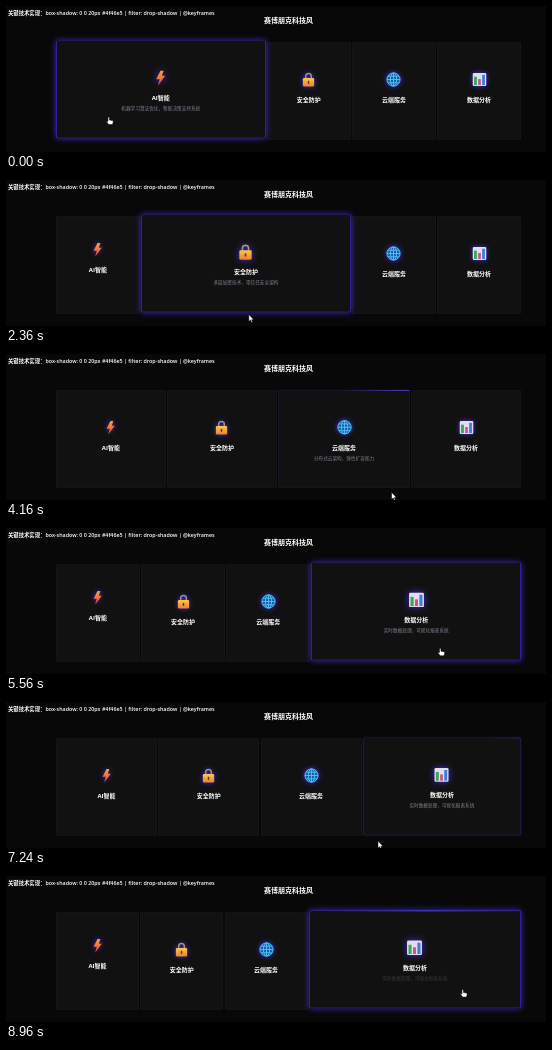
An HTML page for the animation above (9000 ms loop, 540 px wide and 146 px high).

```html
<!DOCTYPE html>
<html lang="zh">
<head>
<meta charset="utf-8">
<style>
  html, body { margin: 0; width: 100%; height: 100%; overflow: hidden; background: #080808; }
  body { position: relative; color: #fff; font-family: "Open Sans", "Noto Sans CJK SC", "Noto Sans CJK", sans-serif; }
  .note, h1 { position: absolute; margin: 0; white-space: nowrap; }
  .note { left: 2px; top: 2.7px; font-size: 5.35px; line-height: 8px; font-weight: 600; }
  h1 { left: 50px; width: 465px; top: 9.5px; text-align: center; font-size: 7px; line-height: 10px; font-weight: 700; }
  .row { position: absolute; left: 50px; top: 36px; width: 465px; height: 97.5px; display: flex; gap: 1.3px; }
  .card { position: relative; flex: 1 1 0; min-width: 0; overflow: hidden; border-radius: 2px; background: #111;
    display: flex; flex-direction: column; align-items: center; justify-content: center; }
  .line { position: absolute; top: 0; width: 100%; height: 1px; background: linear-gradient(90deg, transparent, #4f46e5, transparent); }
  .icon { width: 15px; height: 15px; margin: 4px 0 3px; overflow: visible; flex: none; }
  b { margin-top: 6px; font-size: 6px; line-height: 8px; white-space: nowrap; }
  p { margin: 3.2px 0 0; padding: 0 7.5px; font-size: 4.65px; line-height: 7px; color: #7a808c; text-align: center; }
  #cursor { position: absolute; z-index: 5; left: 0; top: 0; width: 8px; height: 10px; overflow: visible; }
  #cursor path { fill: #fff; stroke: #000; stroke-width: .5; }
</style>
</head>
<body>
<div class="note">关键技术实现：box-shadow: 0 0 20px #4f46e5 | filter: drop-shadow | @keyframes</div>
<h1>赛博朋克科技风</h1>
<div class="row"></div>
<svg id="cursor">
  <path id="arrow" d="M0 0V7L1.6 5.6 2.7 8 3.8 7.5 2.8 5.2H5Z"/>
  <path id="hand" d="M0 .6Q.8-.4 1.5.6V3L4.6 3.6Q5.5 3.9 5.2 5L4.6 7.6H.8L-1.6 4.6Q-1.4 3.6 0 4.6Z"/>
</svg>
<svg width="0" height="0" style="position:absolute">
  <linearGradient id="fire" x2="0" y2="1"><stop stop-color="#ffa03a"/><stop offset="1" stop-color="#e8483f"/></linearGradient>
  <linearGradient id="gold" x2="0" y2="1"><stop stop-color="#ffc648"/><stop offset="1" stop-color="#ec8030"/></linearGradient>
</svg>
<script>
const LOOP = 9000, DURATION = 500, LAG = 20;
const FLOOR = 134, REACH = 23, DIP = 8;

const cards = [
  ['AI智能', '机器学习算法优化，智能决策支持系统',
    '<path fill="url(#fire)" d="M8 1H11L9.4 6H12.5L5.5 15.5 7.2 9.2H3.8Z"/>'],
  ['安全防护', '多层加密技术，零信任安全架构',
    '<path fill="none" stroke="#a0908e" stroke-width="1.6" d="M5 8V4.6a3 3 0 0 1 6 0V8"/>' +
    '<rect x="2" y="6.5" width="12" height="9" rx="1.3" fill="url(#gold)"/>' +
    '<path stroke="#4b3540" stroke-width="1.6" stroke-linecap="round" d="M8 10v2"/>'],
  ['云端服务', '分布式云架构，弹性扩容能力',
    '<circle cx="8" cy="8" r="7.4" fill="#0f62ad"/><g fill="none" stroke="#62c4f5" stroke-width=".9">' +
    '<circle cx="8" cy="8" r="7"/><ellipse cx="8" cy="8" rx="3.3" ry="7"/>' +
    '<path d="M8 1V15M1 8H15M2.2 4.5H13.8M2.2 11.5H13.8"/></g>'],
  ['数据分析', '实时数据处理，可视化报表系统',
    '<rect x=".8" y="1" width="14.4" height="14" rx="1.2" fill="#e2dcee"/>' +
    '<path fill="#35a853" d="M2.2 5H5.2V14H2.2Z"/><path fill="#c9508f" d="M6.6 7.5H9.4V14H6.6Z"/>' +
    '<path fill="#3d7fd6" d="M10.8 3H13.8V14H10.8Z"/>']
];

// Pointer visits: card, time in, time out, x halfway through
const visits = [
  [0, -620, 620, 102], [1, 1230, 2350, 199], [2, 2960, 4010, 365], [3, 4830, 5750, 430],
  [3, 6390, 7145, 469], [1, 7580, 8190, 218], [3, 8725, 9400, 461]
].map(([card, from, to, x]) => ({ card, from, to, x, mid: (from + to) / 2 }));

const clamp = v => Math.min(1, Math.max(0, v));
const smooth = v => (v = clamp(v), v * v * (3 - 2 * v));
const $ = id => document.getElementById(id);

function bezier(x1, y1, x2, y2) {
  const at = (a, b, u) => 3 * a * u * (1 - u) ** 2 + 3 * b * u * u * (1 - u) + u ** 3;
  return x => {
    x = clamp(x);
    let lo = 0, hi = 1;
    for (let i = 0; i < 20; i++) {
      const mid = (lo + hi) / 2;
      if (at(x1, x2, mid) < x) lo = mid; else hi = mid;
    }
    return at(y1, y2, hi);
  };
}
const spring = bezier(.175, .885, .32, 1.275);
const ease = bezier(.25, .1, .25, 1);

const views = cards.map(([title, text, art]) => {
  const el = document.createElement('div');
  el.className = 'card';
  el.innerHTML = `<i class="line"></i><svg class="icon" viewBox="0 0 16 16">${art}</svg><b>${title}</b><p>${text}</p>`;
  document.querySelector('.row').append(el);
  return { el, line: el.children[0], icon: el.children[1], text: el.children[3] };
});

// Progress of a hover transition for one card
function hoverState(card, t, curve, length, delay = 0) {
  t -= LAG;
  const last = visits.filter(v => v.card === card && v.from <= t).pop();
  if (!last) return 0;
  return t < last.to ? curve((t - last.from - delay) / length) : 1 - curve((t - last.to - delay) / length);
}

// The pointer arcs up into each card and dips below the row in between
function pointer(t) {
  const a = visits.findLast(v => v.mid <= t), b = visits[visits.indexOf(a) + 1] || a;
  const x = a.x + (b.x - a.x) * smooth((t - a.mid) / (b.mid - a.mid || 1));
  const arc = (from, to) => Math.sin(Math.PI * (t - from) / (to - from));
  const inside = visits.find(v => v.from <= t && t < v.to);
  const y = inside ? FLOOR - REACH * arc(inside.from, inside.to) : FLOOR + DIP * arc(a.to, b.from);
  return { x, y, inside };
}

function draw(now) {
  const t = now % LOOP;
  views.forEach(({ el, line, icon, text }, i) => {
    const p = hoverState(i, t, spring, DURATION), glow = Math.max(0, p);
    el.style.flexGrow = 1 + 1.5 * p;
    el.style.transform = `translateY(${-1.6 * p}px)`;
    el.style.zIndex = glow > .05 ? 1 : 0;
    el.style.boxShadow = `0 0 ${6 * glow}px rgba(70,48,225,${clamp(glow) * .85}),` +
      `inset 0 0 0 .7px rgba(62,38,205,${clamp(glow)}), inset 0 0 0 .6px #181818`;
    line.style.left = -100 + 200 * hoverState(i, t, ease, 700) + '%';
    icon.style.transform = `scale(${1 + .1 * p})`;
    icon.style.filter = `drop-shadow(0 0 ${2.5 + glow}px #4530d8)`;
    text.style.opacity = hoverState(i, t, smooth, 300, 100);
  });
  const { x, y, inside } = pointer(t);
  $('cursor').style.transform = `translate(${x}px,${y}px)`;
  $('hand').style.display = inside ? '' : 'none';
  $('arrow').style.display = inside ? 'none' : '';
}

const start = performance.now();
(function tick() {
  draw(performance.now() - start);
  requestAnimationFrame(tick);
})();
</script>
</body>
</html>
```
